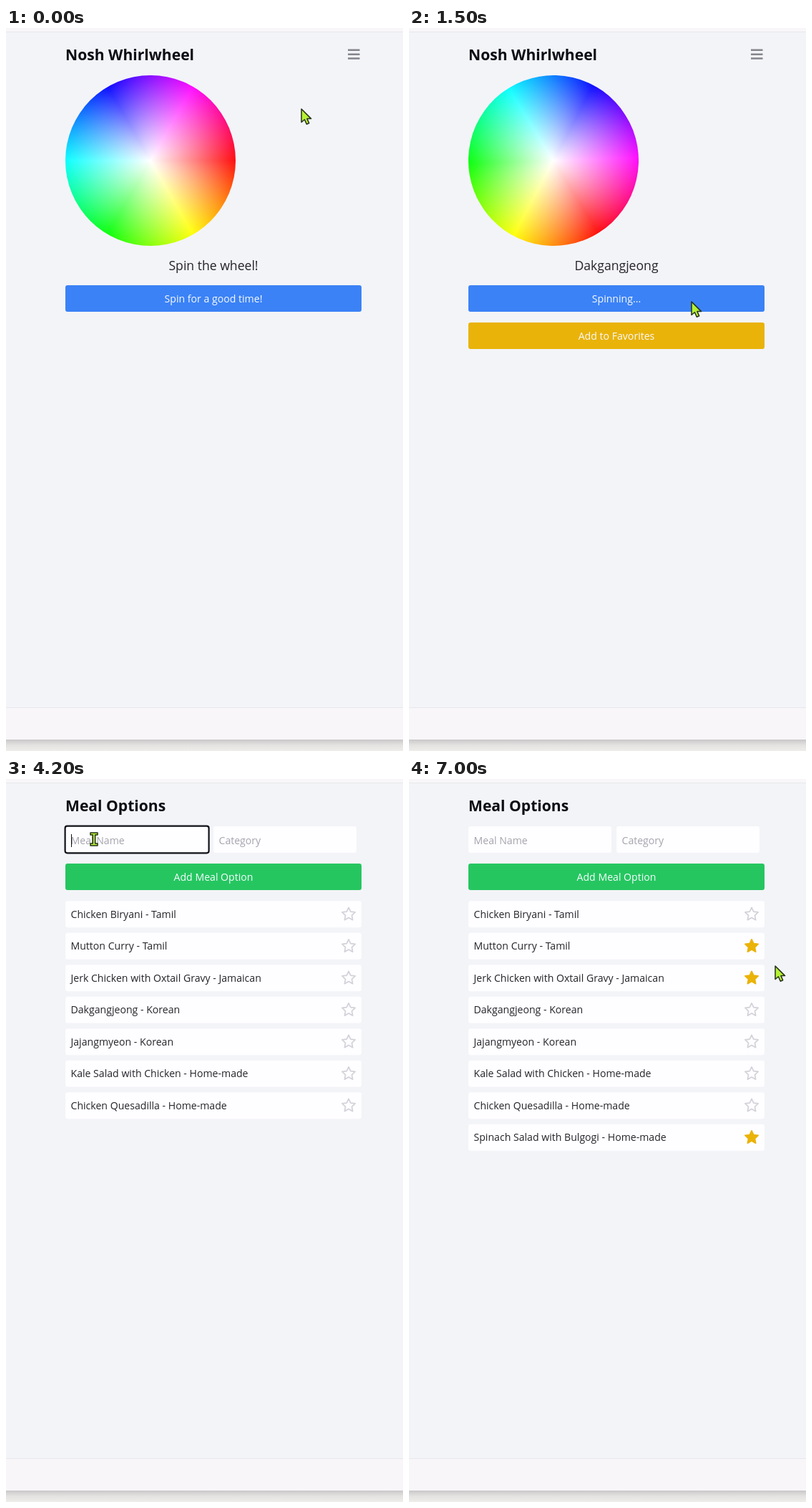
Write an HTML page that moves like this. It is 555 px wide and 1009 px high and loops after 7100 ms.

```html
<!DOCTYPE html>
<html lang="en">
<head>
<meta charset="utf-8">
<title>Meal picker</title>
<style>
  html, body { margin: 0; width: 100%; height: 100%; overflow: hidden; background: #f3f4f8; }
  #wheel {
    position: absolute; left: 83px; top: 65.5px; width: 238px; height: 238px; border-radius: 50%;
    background: radial-gradient(closest-side, #fff, #fff0 106%),
      conic-gradient(from 90deg, red, #ff0, #0f0, #0ff, #00f, #f0f, red);
  }
  svg { position: absolute; left: 0; top: 0; }
  text { font: 14.1px "Open Sans", sans-serif; fill: #24242a; white-space: pre; }
  .title { font-size: 21.1px; font-weight: 700; fill: #0c0d14; }
  .result { font-size: 17.6px; }
  .label { fill: #f8faff; }
  .mid { text-anchor: middle; }
  .field { fill: #fefdff; }
  .star { fill: none; stroke: #d3d2d9; stroke-width: 1.7; stroke-linejoin: round; }
  .star.on { fill: #eab308; stroke: #eab308; }
  .star.white { fill: #fff; stroke: #fff; }
  .pointer { fill: #b5f035; stroke: #25301a; stroke-width: 1.5; stroke-linejoin: round; }
</style>
</head>
<body>
<div id="wheel"></div>
<svg width="555" height="1009" viewBox="0 0 555 1009">
  <defs>
    <linearGradient id="shade" x2="0" y2="1">
      <stop stop-color="#c9c8c9"/><stop offset=".5" stop-color="#e5e3e1"/><stop offset="1" stop-color="#efedea"/>
    </linearGradient>
    <path id="star" d=""/>
  </defs>
  <path fill="#f8f6f8" d="M0 0H555V5H0ZM0 949H555V993H0Z"/>
  <path stroke="#e7e7eb" d="M0 5.5H555M0 948.5H555"/>
  <rect y="993" width="555" height="16" fill="url(#shade)"/>

  <g id="spinPage">
    <text class="title" x="83" y="45">Nosh Whirlwheel</text>
    <path stroke="#85848c" stroke-width="2.4" d="M478 30.7H494.5M478 36.7H494.5M478 42.5H494.5"/>
    <text id="result" class="result mid" x="290" y="338"></text>
    <rect x="83" y="359" width="414" height="37" rx="3" fill="#3b82f6"/>
    <text id="spinLabel" class="label mid" x="290" y="383"></text>
    <g id="favorite">
      <rect x="83" y="411" width="414" height="37" rx="3" fill="#e9b30a"/>
      <text id="favLabel" class="label mid" y="435"></text>
      <use id="favStar" href="#star" class="star white" x="368" y="430"/>
    </g>
  </g>

  <g id="optionsPage">
    <text class="title" x="83" y="45">Meal Options</text>
    <rect class="field" x="83" y="66" width="200" height="37" rx="3"/>
    <rect class="field" x="290" y="66" width="200" height="37" rx="3"/>
    <rect id="ring" y="65.7" width="201" height="37.6" rx="3" fill="none" stroke="#101018" stroke-width="2.2"/>
    <text id="name" x="90.5" y="91"></text>
    <text id="category" x="297.5" y="91"></text>
    <path id="caret" stroke="#111" d="M91.5 77V95"/>
    <rect x="83" y="118" width="414" height="37" rx="3" fill="#25c660"/>
    <text class="label mid" x="290" y="142">Add Meal Option</text>
    <g id="rows"></g>
  </g>

  <g id="pointer" class="pointer">
    <path id="arrow" d="M0 0V18.5L4.4 14.8L7.3 21.3L10.7 19.8L7.9 13.6H13.6Z"/>
    <path id="beam" d="M-5-9H5V-6H1.7V6H5V9H-5V6H-1.7V-6H-5Z"/>
    <path id="hand" d="M-3.5 1V-10.5Q-2-13 -.5-10.5V-4.5L1.5-5L3-3.8L5-4.2L6.3-2.8L8.5-2.5V4L6.3 8V11H-2.5V8.5L-8 2Q-8-1 -5.5-.5Z"/>
  </g>
</svg>
<script>
const LOOP = 7100, STEP = 100;
const $ = id => document.getElementById(id);
const show = (id, on) => $(id).style.display = on ? '' : 'none';
const write = (id, s) => { if ($(id).textContent !== s) $(id).textContent = s; };

const meals = ['Chicken Biryani - Tamil', 'Mutton Curry - Tamil', 'Jerk Chicken with Oxtail Gravy - Jamaican',
  'Dakgangjeong - Korean', 'Jajangmyeon - Korean', 'Kale Salad with Chicken - Home-made',
  'Chicken Quesadilla - Home-made', 'Spinach Salad with Bulgogi - Home-made'];
const [newName, newCategory] = meals[7].split(' - ');
const ADDED = 5400, PAGE_CHANGE = 2800;
const starredAt = { 7: 6100, 2: 6400, 1: 6600 };

const points = Array.from({ length: 10 }, (_, i) => {
  const r = i % 2 ? 4.7 : 9.6, a = i * Math.PI / 5;
  return `${(r * Math.sin(a)).toFixed(2)} ${(.4 - r * Math.cos(a)).toFixed(2)}`;
});
$('star').setAttribute('d', `M${points.join('L')}Z`);
$('rows').innerHTML = meals.map((meal, i) => `<g id="row${i}" transform="translate(0 ${170.3 + i * 44.5})">
  <rect class="field" x="83" width="414" height="37" rx="3"/>
  <text x="90.5" y="23.7">${meal}</text>
  <use id="star${i}" href="#star" class="star" x="479" y="18.2"/></g>`).join('');

// Keys are [time, ...values]
const spin = [[0, 0], [600, 0], [700, 45], [800, 220], [900, 350], [1000, 400], [1400, 400],
  [1500, 418], [1600, 600], [1700, 775], [1800, 885], [1900, 930]];
const path = [[0, 413, 113], [100, 413, 113], [400, 392, 375], [700, 389, 377], [1200, 395, 382],
  [1800, 395, 382], [2000, 405, 428], [2100, 405, 428], [2300, 481, 36], [2500, 481, 36],
  [3200, 524, 620], [3500, 524, 620], [4100, 123, 84], [5000, 123, 84], [5300, 302, 142],
  [5800, 302, 142], [6000, 479, 500], [6100, 479, 500], [6300, 479, 278], [6400, 479, 278],
  [6500, 479, 234], [6700, 479, 234], [6900, 512, 261]];

function at(keys, t) {
  const i = keys.findIndex(k => k[0] > t);
  if (i < 0) return keys[keys.length - 1].slice(1);
  const a = keys[i - 1], b = keys[i], f = (t - a[0]) / (b[0] - a[0]);
  return a.slice(1).map((v, j) => v + (b[j + 1] - v) * f);
}
const within = (t, from, to) => t >= from && t < to;

function field(id, value, hint, t, from, to) {
  const part = t >= ADDED ? 0 : Math.min(1, Math.max(0, (t - from) / (to - from)));
  const typed = value.slice(0, Math.round(value.length * part));
  write(id, typed || hint);
  $(id).style.fill = typed ? '' : '#a5a4ad';
}

function drawSpin(t) {
  $('wheel').style.transform = `rotate(${at(spin, t)[0]}deg)`;
  const spinning = within(t, 500, 1000) || within(t, 1400, 1900);
  const saved = t >= 2100;
  write('result', t < 1000 ? 'Spin the wheel!' : t < 1900 ? 'Dakgangjeong' : 'Mutton Curry');
  write('spinLabel', spinning ? 'Spinning...' : 'Spin for a good time!');
  show('favorite', t >= 1000);
  show('favStar', saved);
  write('favLabel', saved ? 'Remove from Favorites' : 'Add to Favorites');
  $('favLabel').setAttribute('x', saved ? 275 : 290);
}

function drawOptions(t) {
  field('name', newName, 'Meal Name', t, 4300, 4700);
  field('category', newCategory, 'Category', t, 4800, 5000);
  show('ring', within(t, 4200, 5300));
  $('ring').setAttribute('x', t < 4800 ? 82.6 : 289.6);
  show('caret', within(t, 4200, 4400));
  show('row7', t >= ADDED);
  for (const i in starredAt) $('star' + i).classList.toggle('on', t >= starredAt[i]);
}

function frame(now) {
  const t = Math.floor(now % LOOP / STEP) * STEP;
  const options = t >= PAGE_CHANGE;
  show('wheel', !options);
  show('spinPage', !options);
  show('optionsPage', options);
  (options ? drawOptions : drawSpin)(t);

  const [x, y] = at(path, t);
  const beam = within(t, 4100, 5100), hand = within(t, 5300, 5900) || within(t, 6000, 6800);
  $('pointer').setAttribute('transform', `translate(${x} ${y})`);
  show('beam', beam);
  show('hand', hand);
  show('arrow', !beam && !hand);
  requestAnimationFrame(frame);
}
frame(performance.now());
</script>
</body>
</html>
```
